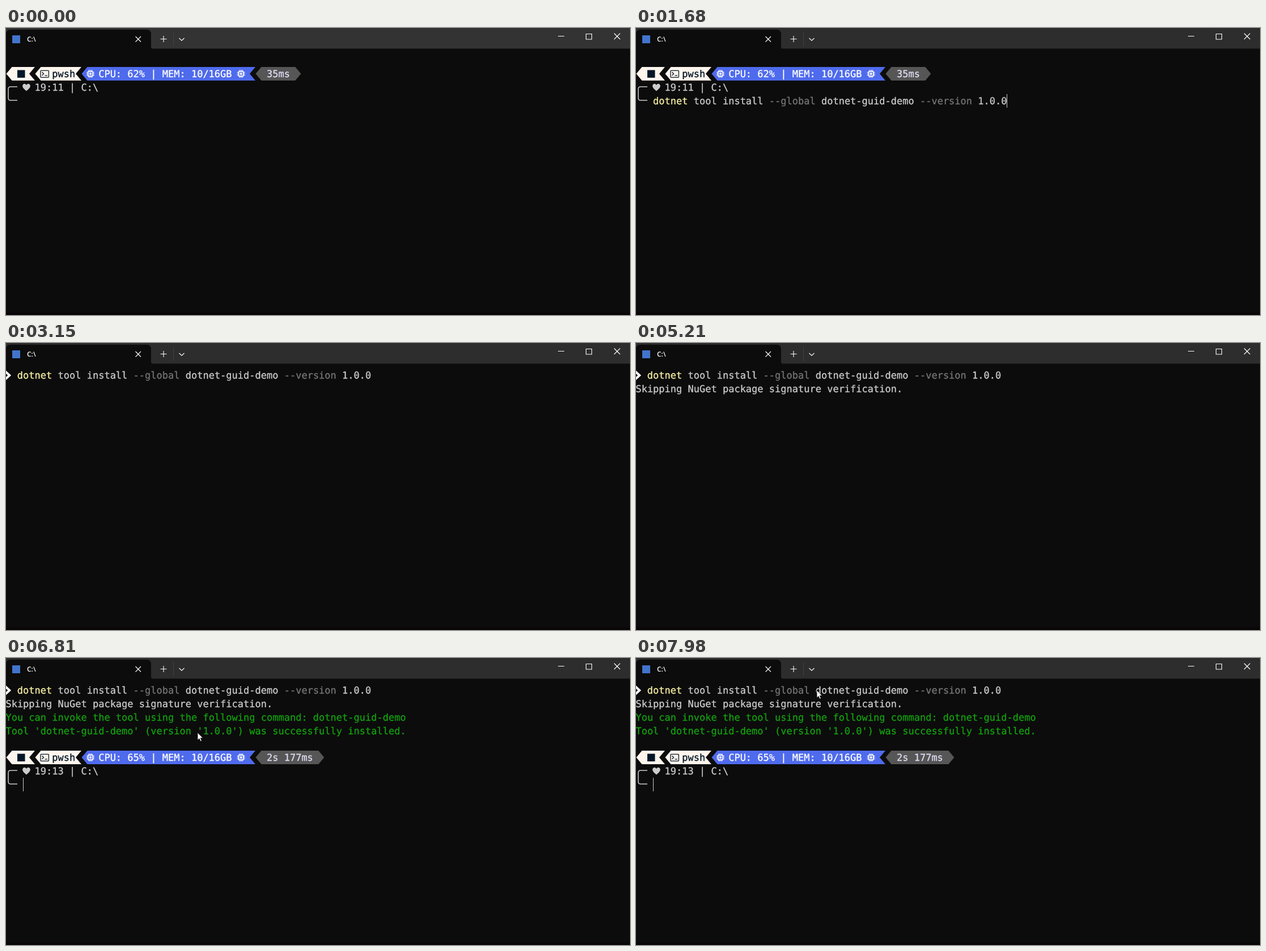
Recreate the animation shown at these times as an HTML page. Size 1101 by 508 pixels, loop 8 s.

```html
<!DOCTYPE html>
<html lang="en">
<head>
<meta charset="utf-8">
<title>Terminal</title>
<style>
  html, body { margin: 0; width: 100%; height: 100%; overflow: hidden; background: #0c0c0c; }
  svg { display: block; }
  text { font: 17px "DejaVu Sans Mono", monospace; white-space: pre; text-rendering: geometricPrecision; }
  text, tspan { fill: currentColor; stroke: currentColor; stroke-width: .3; }
  .line { fill: none; stroke: #fff; stroke-width: 1.1; }
  .tab { font: 600 12px "Open Sans", sans-serif; color: #fff; stroke: none; }
</style>
</head>
<body>
<svg width="1101" height="508" viewBox="0 0 1101 508">
  <rect width="1101" height="508" fill="#0c0c0c"/>
  <rect y="504" width="1101" height="4" fill="#0a0608"/>
  <rect id="bar" width="1101" height="36.5"/>
  <path d="M0 37V11Q0 3 8 3H248Q256 3 256 11V33Q256 37 260 37Z" fill="#0c0c0c"/>
  <rect x="11" y="13" width="14" height="14" fill="#4274cc"/>
  <text class="tab" x="37" y="24">C:\</text>
  <path d="M295.5 7V32" stroke="#414141"/>
  <path class="line" d="M228.5 15l9.5 9.5m0-9.5l-9.5 9.5M272.5 19.5h11m-5.5-5.5v11M305.5 18l4.5 4.2 4.5-4.2M974 14.5h11M1023.5 10.5h10v9.5h-10zM1073 9.5l10.5 10.5m0-10.5l-10.5 10.5"/>
  <g id="screen"></g>
  <rect id="caret" width="1" height="24" fill="#ccc"/>
  <path id="mouse" d="M0 0V13.5L3.1 10.7 5.2 15.6 7.4 14.6 5.3 9.8H9.5Z" fill="#fff" stroke="#000" stroke-width=".8"/>
</svg>
<script>
const LOOP = 8000, COL = 10.235;
const $ = id => document.getElementById(id);
const COMMAND = [
  ["dotnet", "#f9f1a5"], [" tool install ", "#ccc"], ["--global", "#767676"],
  [" dotnet-guid-demo ", "#ccc"], ["--version", "#767676"], [" 1.0.0", "#ccc"]
];
const LENGTH = COMMAND.reduce((sum, [s]) => sum + s.length, 0);

const baseline = row => Math.round(63.2 + 23.85 * row);
const text = (col, row, body, color = "#ccc") =>
  `<text x="${col * COL - .6}" y="${baseline(row)}" style="color:${color}">${body}</text>`;

function command(col, row, count = LENGTH) {
  let spans = "";
  for (const [s, color] of COMMAND) {
    spans += `<tspan style="color:${color}">${s.slice(0, Math.max(0, count))}</tspan>`;
    count -= s.length;
  }
  return text(col, row, spans);
}

// A ribbon with a pointed left end and a notched or pointed right end.
const ribbon = (x, end, color, tip = -10) =>
  `<path d="M${x} 12l10-12H${end}l${tip} 12 ${-tip} 12H${x + 10}z" fill="${color}"/>`;
const arrow = (x, end, color) =>
  `<path d="M${x} 12l10-12H${end}l10 12-10 12H${x + 10}z" fill="${color}"/>`;

const chip = x => `<g transform="translate(${x} 12)" fill="none" stroke="#fff">
  <rect x="-4.2" y="-4.2" width="8.4" height="8.4" rx="1" stroke-width="1.8"/>
  <path d="M-2.5-7v3M0-7v3M2.5-7v3M-2.5 7v-3M0 7v-3M2.5 7v-3M-7-2.5h3M-7 0h3M-7 2.5h3M7-2.5h-3M7 0h-3M7 2.5h-3" stroke-width="1.2"/>
  <rect x="-1.2" y="-1.2" width="2.4" height="2.4" stroke-width="1.4"/></g>`;

function prompt(row, cpu, took, clock) {
  const dark = "#011627", top = baseline(row) - 18;
  return `<g transform="translate(0 ${top})">
    ${ribbon(.5, 51, "#fef5ed")}${ribbon(51.5, 133, "#fef5ed")}
    ${ribbon(133.5, 440, "#4f6bed")}${arrow(440.5, 469.5 + took.length * COL, "#575656")}
    <rect x="20" y="5.5" width="13.5" height="13.5" fill="${dark}"/>
    <g fill="none" stroke="${dark}" stroke-width="1.3">
      <rect x="61" y="6.3" width="14.4" height="12" rx="1"/><path d="M63.5 9l3 3-3 3M68.5 15.2h4.5"/></g>
    ${chip(149)}${chip(414.7)}
    <path d="M20 35H8Q4 35 4 39V55Q4 59 8 59H20" fill="none" stroke="#ccc" stroke-width="1.5"/>
    <path d="M36 42.5C31 38.5 29 36 29.2 33.2C29.5 29.5 34 28.5 36 32C38 28.5 42.5 29.5 42.8 33.2C43 36 41 38.5 36 42.5Z" fill="#ccc"/></g>`
    + text(8, row, "pwsh", dark)
    + text(16, row, `CPU: ${cpu}% | MEM: 10/16GB`, "#fff")
    + text(45, row, took, "#e0def4")
    + text(5, row + 1, `${clock} | C:\\`);
}

function screenAt(t) {
  if (t < 3080) {
    const typed = t < 1420 ? 0 : Math.ceil(LENGTH * Math.min(1, (Math.floor((t - 1420) / 70) + 1) / 4));
    return prompt(1, 62, "35ms", "19:11") + command(3, 3, typed);
  }
  let out = `<path d="M-1.5 50L6.2 57.2L-1.5 64.5" fill="none" stroke="#fff" stroke-width="4"/>` + command(2, 0);
  if (t >= 5210) out += text(0, 1, "Skipping NuGet package signature verification.");
  if (t >= 5280) {
    out += text(0, 2, "You can invoke the tool using the following command: dotnet-guid-demo", "#13a10e")
      + text(0, 3, "Tool 'dotnet-guid-demo' (version '1.0.0') was successfully installed.", "#13a10e");
  }
  if (t >= 5410) out += prompt(5, 65, "2s 177ms", "19:13");
  return out;
}

// Time, x, y
const PATHS = [
  [[730, 779, 419], [870, 610, 349], [1010, 415, 272], [1150, 298, 235], [1220, 278, 230], [1420, 278, 230]],
  [[3080, 278, 230], [3150, 278, 230]],
  [[6600, 300, 198], [6810, 338, 132], [7020, 349, 6], [7160, 346, 16], [7370, 324, 57], [7440, 321, 57],
   [7650, 321, 57], [7930, 319, 57], [LOOP, 319, 57]]
];

function mouseAt(t) {
  const path = PATHS.find(p => t >= p[0][0] && t < p.at(-1)[0]);
  if (!path) return null;
  const time = path[0][0] + Math.floor((t - path[0][0]) / 70) * 70;
  const i = path.findIndex(k => k[0] > time);
  const [a, b] = [path[i - 1], path[i]], f = (time - a[0]) / (b[0] - a[0]);
  return [a[1] + (b[1] - a[1]) * f, a[2] + (b[2] - a[2]) * f];
}

const within = (t, ...spans) => spans.some(([a, b]) => t >= a && t < b);
const show = (node, on) => node.setAttribute("visibility", on ? "visible" : "hidden");
let shown = "";

function draw(now) {
  const t = now % LOOP;
  const html = screenAt(t);
  if (html !== shown) $("screen").innerHTML = shown = html;
  $("bar").setAttribute("fill", t < 1220 ? "#333" : "#2d2d2d");

  const caret = $("caret");
  show(caret, within(t, [1220, 1420], [1680, 2210], [2750, 3010], [5410, 5870], [6340, 6870], [7440, LOOP]));
  caret.setAttribute("x", within(t, [1420, 3080]) ? 654 : 30);
  caret.setAttribute("y", t < 3080 ? 117 : 212);

  const spot = mouseAt(t);
  show($("mouse"), spot);
  if (spot) $("mouse").setAttribute("transform", `translate(${spot})`);
}

const start = performance.now();
function tick() {
  draw(performance.now() - start);
  requestAnimationFrame(tick);
}
tick();
</script>
</body>
</html>
```
